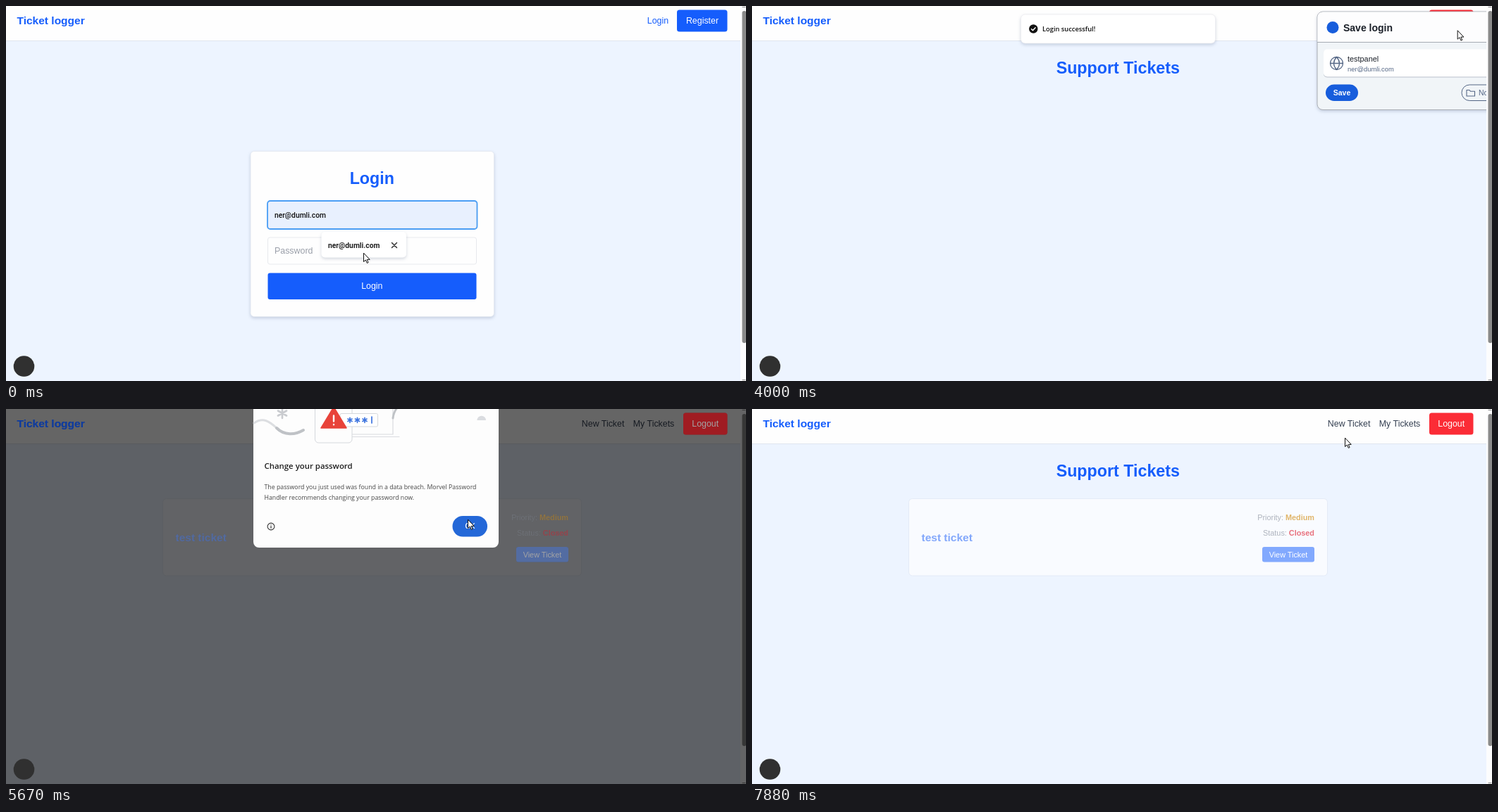
An HTML page that plays this animation: 1050 px wide and 533 px high, repeating every 8 s.

```html
<!DOCTYPE html>
<html lang="en">
<head>
<meta charset="utf-8">
<title>Ticket logger</title>
<style>
  html, body { margin: 0; width: 100%; height: 100%; overflow: hidden; background: #edf4ff; }
  svg { display: block; width: 1050px; height: 533px; }
  text { font-family: "Liberation Sans", Arial, sans-serif; font-size: 12.4px; white-space: pre; }
  .b { font-weight: 700; }
  .h1 { font-size: 23.25px; font-weight: 700; fill: #155dfc; }
  .h2 { font-size: 15.5px; font-weight: 700; }
  .sm { font-size: 10.85px; }
  .ui { font-family: "Open Sans", "Noto Sans", sans-serif; }
  .fill { font-family: Roboto, sans-serif; font-size: 10.3px; font-weight: 500; }
  .mid { text-anchor: middle; }
  .end { text-anchor: end; }
  .soft { filter: drop-shadow(0 2px 2px rgba(40, 60, 100, .2)); }
</style>
</head>
<body>
<svg id="stage" viewBox="0 0 1050 533"></svg>
<script>
const LOOP = 8000;
const EMAIL = 'ner@dumli.com';
const BLUE = '#155dfc';

const rect = (x, y, w, h, r, fill, more = '') =>
  `<rect x="${x}" y="${y}" width="${w}" height="${h}" rx="${r}" fill="${fill}" ${more}/>`;
const text = (x, y, str, cls = '', fill = '#364153', more = '') =>
  `<text x="${x}" y="${y}" class="${cls}" fill="${fill}" ${more}>${str}</text>`;
const path = (d, stroke, width = 1, fill = 'none') =>
  `<path d="${d}" stroke="${stroke}" stroke-width="${width}" fill="${fill}" stroke-linecap="round" stroke-linejoin="round"/>`;
const circle = (x, y, r, fill, more = '') =>
  `<circle cx="${x}" cy="${y}" r="${r}" fill="${fill}" ${more}/>`;
const group = (id, body, more = '') => `<g id="${id}" ${more}>${body}</g>`;
const size = px => `style="font-size:${px}px"`;
const semi = px => `style="font-size:${px}px;font-weight:600"`;

const brand = text(15.5, 26, 'Ticket logger', 'h2', BLUE);
const logout = rect(961, 5.5, 62.5, 31, 3.5, '#fb2c36') + text(992.2, 25, 'Logout', 'mid', '#fff');
const cardText =
  text(240.5, 187.5, 'test ticket', 'h2', '#82a7fb') +
  text(798, 158, 'Priority: <tspan class="b" fill="#e0b56a">Medium</tspan>', 'sm end', '#aeb3bd') +
  text(798, 180, 'Status: <tspan class="b" fill="#e8707c">Closed</tspan>', 'sm end', '#aeb3bd') +
  rect(724, 196, 74, 21.5, 3, '#82a9fe') + text(761, 210.5, 'View Ticket', 'sm mid', '#fff');

const ring = (id, y) =>
  group(id, rect(371, y, 297.5, 40, 4, 'none', 'stroke="#4b9ef5" stroke-width="1.8"'));

const page =
  rect(0, 0, 1050, 533, 0, '#edf4ff') +
  rect(0, 0, 1042, 49, 0, '#fefefe') + rect(0, 49, 1042, 1, 0, '#dfe5ee') + brand;

const login = group('login',
  text(909.8, 25, 'Login', '', BLUE) +
  rect(952, 5.5, 71.5, 31, 3.5, BLUE) + text(988, 25, 'Register', 'mid', '#fff') +
  rect(347, 206.5, 345.5, 235, 5, '#fefefe', 'class="soft" stroke="#e3e8f0" stroke-width=".8"') +
  text(519.3, 252.5, 'Login', 'h1 mid') +
  rect(371.5, 277.5, 296, 38.5, 3, '#e8f0fe', 'id="email" stroke="#dfe4ec" stroke-width=".9"') +
  text(381, 301, EMAIL, 'fill', '#111', 'id="preview"') +
  text(381, 301, EMAIL, '', '#111', 'id="filled"') +
  rect(371.5, 329, 296, 38, 3, '#fefefe', 'stroke="#e5e7eb" stroke-width=".9"') +
  text(381, 352, 'Password', '', '#9a9fa9', 'id="hint"') +
  [0, 1, 2, 3].map(i => circle(383.2 + i * 4.4, 347.5, 1.6, '#333', `id="dot${i}"`)).join('') +
  rect(0, 341, 1, 13.5, 0, '#222', 'id="caret"') +
  ring('ringEmail', 277) + ring('ringPass', 328) +
  rect(371.5, 379.5, 296, 37.5, 3, BLUE) + text(519.3, 402, 'Login', 'mid', '#fff') +
  group('suggest',
    rect(447.5, 321, 120.5, 36.5, 5, '#fff', 'class="soft"') +
    text(457, 344, EMAIL, 'fill', '#222', 'style="font-weight:600"') +
    path('M547.5 336.5l7 7m0-7l-7 7', '#333', 1.5)));

const tickets = group('tickets',
  text(816.8, 25, 'New Ticket') + text(889.8, 25, 'My Tickets') + logout +
  text(519.3, 95.5, 'Support Tickets', 'h1 mid') +
  group('card',
    rect(222.5, 127.5, 594, 109.5, 5, '#f7faff', 'id="cardBox" stroke="#e4ebf7"') + cardText));

const saveBar = group('saveBar',
  rect(802, 8, 270, 139.5, 8, '#f1f5f8', 'class="soft" stroke="#a9adb4"') +
  path('M802.5 51.5V16q0-7.5 8-7.5H1060V51.5Z', 'none', 0, '#fdfdfe') +
  rect(802, 51, 250, 1, 0, '#a5aab2') +
  circle(824, 30.5, 8.5, '#175ddc') +
  text(839, 36, 'Save login', 'b', '#1b2029', size(14)) +
  rect(811, 62.5, 250, 39, 5, '#b9c0cb') + rect(811, 61.5, 250, 39, 5, '#fff') +
  path('M820.5 81.5h18M829.5 72.5a9 9 0 0 0 0 18a9 9 0 0 0 0-18q-8 9 0 18q8-9 0-18', '#546685', 1.3) +
  text(845, 79, 'testpanel', '', '#1b2029', size(10.9)) +
  text(845, 92.5, EMAIL, '', '#546685', size(9.4)) +
  rect(814, 111.5, 46, 23.5, 12, '#175ddc') + text(837, 127, 'Save', 'b mid', '#fff', size(10.5)) +
  rect(1007, 112, 60, 22.5, 11.2, 'none', 'stroke="#546685"') +
  path('M1014 128v-8.500h4l1.500 1.800h6v6.700z', '#546685', 1.1) +
  text(1031, 127, 'No folder', '', '#546685', size(10.5)), 'clip-path="url(#view)"');

const toast = group('toast',
  rect(381.5, 12, 276, 41, 6, '#fff', 'class="soft" stroke="#ececf0" stroke-width=".8"') +
  circle(399.3, 32.5, 6.2, '#111') + path('M396.500 32.800l2 2l3.600-4', '#fff', 1.4) +
  text(412, 36.3, 'Login successful!', 'ui', '#111', semi(9.3)));

const scrollbar =
  rect(1042, 0, 8, 533, 0, '#fcfcfd') + rect(1044.5, 7, 6, 472, 3, '#8a8a8a') +
  path('M1045 1.500h4M1045 531.500h4', '#8a8a8a');

const star = (x, y, r, color, w) => path([0, 60, 120].map(a => {
  const dx = r * Math.sin(a * Math.PI / 180), dy = r * Math.cos(a * Math.PI / 180);
  return `M${x - dx} ${y - dy}L${x + dx} ${y + dy}`;
}).join(''), color, w);

const warning = group('warning',
  rect(0, 0, 1050, 533, 0, '#000', 'opacity=".6"') +
  `<g opacity=".4">${brand}${logout}${cardText}</g>` +
  rect(351, -40, 348, 237, 8, '#fdfdfd') +
  star(392, 6, 7, '#c9cbcf', 2.6) +
  path('M352 20C365 11 374 18 384 27', '#dcdee1', 3) +
  path('M384 27C395 38 410 37 422 30', '#bfc2c6', 4) +
  path('M491 36H549V-4M491 39.500H558', '#dadce0', 1.2) +
  path('M549 13Q550 3 557 -4', '#bfc2c6', 3) +
  rect(438.5, -20, 52.5, 68, 5, '#fdfdfd', 'stroke="#d5d8dc"') +
  rect(474, 6.5, 53.5, 18.500, 2, '#fff', 'stroke="#d5d8dc"') +
  path('M465 -3L447 27H483Z', '#e8433a', 1.5, '#e8433a') +
  path('M465 9.500V17.500M465 22V22.200', '#fff', 2.4) +
  [488, 498.5, 509].map(x => star(x, 15.8, 3.5, '#3d74df', 1.7)).join('') +
  path('M519 11V20', '#3d74df', 1.7) +
  path('M668.500 16a6.200 6.200 0 0 1 12.400 0z', 'none', 0, '#dadce0') +
  text(366.5, 85.3, 'Change your password', 'ui', '#1f1f1f', semi(11.4)) +
  text(366.5, 113.5, 'The password you just used was found in a data breach. Morvel Password', 'ui', '#474747', size(8.77)) +
  text(366.5, 128.7, 'Handler recommends changing your password now.', 'ui', '#474747', size(8.77)) +
  circle(376, 167, 4.900, 'none', 'stroke="#333" stroke-width="1.1"') +
  path('M376 166.500v2.700M376 164.600v.1', '#333', 1.2) +
  rect(633.5, 152, 49.5, 29.5, 14.7, '#2468d8') +
  text(658.3, 170.3, 'OK', 'ui mid', '#fff', semi(10)));

const badge = circle(25.5, 512, 14.8, '#303030');
const pointer =
  group('arrow', path('M.5 .5V12.500L3.300 10L5.300 14.400L7.100 13.600L5.200 9.400H8.800Z', '#111', 1, '#fff')) +
  group('beam', path('M-2.500 -6H-.8L0 -5.300L.8 -6H2.500M0 -5.300V5.300M-2.500 6H-.8L0 5.300L.8 6H2.500', '#222', 1.1));

document.getElementById('stage').innerHTML =
  '<clipPath id="view"><rect width="1042" height="533"/></clipPath>' +
  page + login + tickets + saveBar + toast + scrollbar + warning + badge + pointer;

const el = {};
document.querySelectorAll('#stage [id]').forEach(node => { el[node.id] = node; });

// Visible spans: name -> [from, to)
const spans = {
  login: [0, 3640], tickets: [3640, LOOP], card: [4240, LOOP],
  preview: [0, 240], suggest: [0, 240], filled: [240, LOOP], hint: [0, 1240],
  dot0: [1240, LOOP], dot1: [1480, LOOP], dot2: [1730, LOOP], dot3: [1850, LOOP],
  ringEmail: [0, 480], ringPass: [480, LOOP],
  saveBar: [3140, 4120], toast: [3400, 7860], warning: [4890, 5790], beam: [480, 3400],
};
const typed = [1240, 1480, 1730, 1850];

// Pointer route: time, x, y
const route = [
  [3260, 507, 351], [3400, 560, 320], [3800, 930, 70], [4100, 1036, 17], [4240, 1036, 17],
  [4375, 1004, 30], [4500, 960, 110], [4640, 920, 190], [4990, 920, 190],
  [5300, 770, 178], [5600, 655, 157], [5740, 655, 157], [6000, 810, 112], [6125, 892, 107],
  [6480, 892, 107], [6625, 942, 80], [6750, 940, 82], [7100, 872, 177], [7300, 850, 165],
  [7500, 866, 84], [7700, 851, 55], [7850, 841, 41],
];

function along(t) {
  const i = route.findIndex(p => p[0] > t);
  if (i === 0) return route[0].slice(1);
  if (i < 0) return route[route.length - 1].slice(1);
  const [t0, x0, y0] = route[i - 1], [t1, x1, y1] = route[i];
  const k = (t - t0) / (t1 - t0);
  return [x0 + (x1 - x0) * k, y0 + (y1 - y0) * k];
}

const clamp = v => Math.min(1, Math.max(0, v));
const ease = v => 1 - (1 - clamp(v)) ** 3;
const show = (node, on) => { node.style.display = on ? '' : 'none'; };

function draw(t) {
  for (const id in spans) show(el[id], t >= spans[id][0] && t < spans[id][1]);

  const count = typed.filter(at => t >= at).length;
  const sinceKey = t - (typed[count - 1] || 0);
  show(el.caret, count > 0 && sinceKey % 1000 < 500);
  el.caret.setAttribute('x', 381 + 4.4 * count);
  el.email.setAttribute('fill', t < 3140 ? '#e8f0fe' : '#eef4ff');
  el.cardBox.setAttribute('fill', t < 5790 ? '#f6f9ff' : '#f9fbff');

  const tick = Math.floor((t + 20) / 125) * 125;
  const enter = ease((tick - 3300) / 400), leave = ease((tick - 7400) / 450);
  el.toast.setAttribute('transform', `translate(0 ${-56 * (1 - enter) - 41 * leave})`);
  el.toast.setAttribute('opacity', enter * (1 - leave));

  show(el.arrow, t < spans.beam[0] || t >= spans.beam[1]);
  el.arrow.setAttribute('transform', `translate(${along(tick).join(' ')})`);
  el.beam.setAttribute('transform', 'translate(502.500 356.500)');
}

function frame() {
  draw(performance.now() % LOOP);
  requestAnimationFrame(frame);
}
frame();
</script>
</body>
</html>
```
